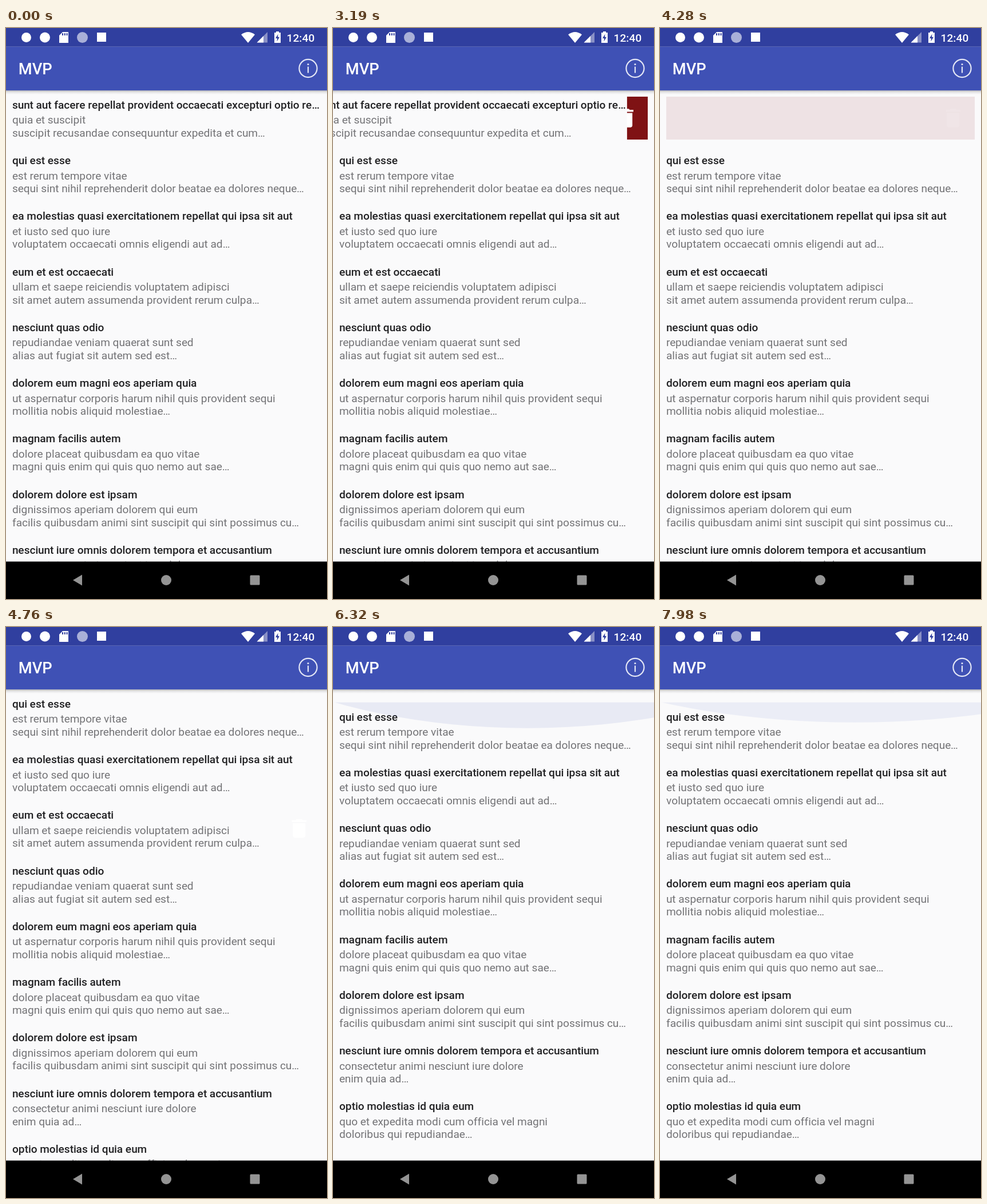
Recreate the animation shown at these times as an HTML page with a canvas. Size 561 by 998 pixels, loop 8 s.

```html
<!DOCTYPE html>
<html lang="la">
<head>
<meta charset="utf-8">
<title>Swipe to delete</title>
<style>
html, body { margin: 0; width: 100%; height: 100%; overflow: hidden; background: #000; }
canvas { display: block; }
</style>
</head>
<body>
<canvas id="stage" width="561" height="998"></canvas>
<script>
const ctx = document.getElementById('stage').getContext('2d');
const W = 561, H = 998, LOOP = 8000;

// Layout follows a 1080 px wide device at 2.625 px per dp
const DEVICE = W / 1080, DENSITY = 2.625;
const dp = n => n * DENSITY * DEVICE;

const BAR = dp(24), HEAD = dp(80), NAV = H - dp(48);
const LEFT = dp(8), RIGHT = W - LEFT, TOP = HEAD + LEFT;
const PITCH = 97.25, CELL = dp(55);
const SHORT = PITCH * 8, INSET = (NAV - HEAD - SHORT) / 2;
const BG = '#fafafb', RED = '#7f1214', DARK = '#303f9f';

const rows = [
  ['sunt aut facere repellat provident occaecati excepturi optio re…', 'quia et suscipit', 'suscipit recusandae consequuntur expedita et cum…'],
  ['qui est esse', 'est rerum tempore vitae', 'sequi sint nihil reprehenderit dolor beatae ea dolores neque…'],
  ['ea molestias quasi exercitationem repellat qui ipsa sit aut', 'et iusto sed quo iure', 'voluptatem occaecati omnis eligendi aut ad…'],
  ['eum et est occaecati', 'ullam et saepe reiciendis voluptatem adipisci', 'sit amet autem assumenda provident rerum culpa…'],
  ['nesciunt quas odio', 'repudiandae veniam quaerat sunt sed', 'alias aut fugiat sit autem sed est…'],
  ['dolorem eum magni eos aperiam quia', 'ut aspernatur corporis harum nihil quis provident sequi', 'mollitia nobis aliquid molestiae…'],
  ['magnam facilis autem', 'dolore placeat quibusdam ea quo vitae', 'magni quis enim qui quis quo nemo aut sae…'],
  ['dolorem dolore est ipsam', 'dignissimos aperiam dolorem qui eum', 'facilis quibusdam animi sint suscipit qui sint possimus cu…'],
  ['nesciunt iure omnis dolorem tempora et accusantium', 'consectetur animi nesciunt iure dolore', 'enim quia ad…'],
  ['optio molestias id quia eum', 'quo et expedita modi cum officia vel magni', 'doloribus qui repudiandae…']
];

// 0 before a, 1 after b, linear between
const ramp = (t, a, b) => Math.min(1, Math.max(0, (t - a) / (b - a)));

// Row closing: eased, stalls part way, then snaps shut
function closing(t, start, snap) {
  if (t >= snap) return 1;
  return (1 - Math.cos(Math.PI * 0.64 * ramp(t, start, start + 160))) / 2;
}

function box(x, y, w, h, fill) {
  ctx.fillStyle = fill;
  ctx.fillRect(x, y, w, h);
}

function disc(x, y, r, fill) {
  ctx.fillStyle = fill;
  ctx.beginPath();
  ctx.arc(x, y, r, 0, 7);
  ctx.fill();
}

function poly(fill, ...p) {
  ctx.fillStyle = fill;
  ctx.beginPath();
  for (let i = 0; i < p.length; i += 2) ctx.lineTo(p[i], p[i + 1]);
  ctx.closePath();
  ctx.fill();
}

function clipTo(x, y, w, h) {
  ctx.beginPath();
  ctx.rect(x, y, w, h);
  ctx.clip();
}

const advances = new Map();

function advance(ch) {
  const key = ctx.font + ch;
  if (!advances.has(key)) advances.set(key, Math.round(ctx.measureText(ch).width));
  return advances.get(key);
}

// Glyph advances snap to whole device pixels
function text(str, x, y, sp, weight, fill) {
  ctx.save();
  ctx.translate(x, y);
  ctx.scale(DEVICE, DEVICE);
  ctx.font = `${weight} ${sp * DENSITY}px Roboto, sans-serif`;
  ctx.fillStyle = fill;
  let pen = 0;
  for (const ch of str) {
    ctx.fillText(ch, pen, 0);
    pen += advance(ch);
  }
  ctx.restore();
}

const binPath = new Path2D('M6 19c0 1.1.9 2 2 2h8c1.1 0 2-.9 2-2V7H6v12zM19 4h-3.5l-1-1h-5l-1 1H5v2h14V4z');

function bin(y) {
  ctx.save();
  ctx.translate(512.3, y + CELL / 2);
  ctx.scale(dp(32) / 24, dp(32) / 24);
  ctx.translate(-12, -12);
  ctx.fillStyle = '#fff';
  ctx.fill(binPath);
  ctx.restore();
}

function rowText(row, x, y) {
  text(row[0], x, y + 21, 14, 500, '#212123');
  text(row[1], x, y + 47.4, 14, 400, '#737376');
  text(row[2], x, y + 69.8, 14, 400, '#737376');
}

// slid: how far the front has moved left; alpha: fade of the removed row
function swipedRow(row, y, slid, alpha) {
  if (alpha <= 0) return;
  const edge = RIGHT - slid, x = Math.max(LEFT, edge);
  ctx.save();
  ctx.globalAlpha = alpha;
  if (slid > 0) {
    box(x, y, RIGHT - x, CELL, RED);
    bin(y);
    clipTo(0, y, Math.max(0, edge), CELL);
    box(0, y, edge, CELL, BG);
  }
  rowText(row, LEFT - slid, y);
  ctx.restore();
}

function list(t) {
  const inset = t < 5040 ? 0 : INSET;
  const up = PITCH * closing(t, 4290, 4760);
  const up2 = PITCH * closing(t, 5330, 6110);

  ctx.save();
  clipTo(0, HEAD + inset, W, NAV - HEAD - 2 * inset);
  rows.forEach((row, i) => {
    const y = TOP + inset + i * PITCH - (i > 0 ? up : 0) - (i > 3 ? up2 : 0);
    if (i === 0) {
      const slid = 139 * ramp(t, 3110, 3420) + 311 * ramp(t, 3590, 3970) ** 2 + 100 * ramp(t, 4150, 4235);
      swipedRow(row, y, slid, 1 - ramp(t, 4200, 4290));
    } else if (i === 3) {
      if (t >= 4760 && t < 4800) bin(y);
      swipedRow(row, y, RIGHT * ramp(t, 4800, 5040), 1 - ramp(t, 5280, 5350));
    } else {
      rowText(row, LEFT, y);
    }
  });
  glow(HEAD + INSET, 1, 340, 46 * Math.sin(Math.PI * ramp(t, 6110, 6480)));
  glow(NAV - INSET, -1, 300, 71 * (ramp(t, 6480, 6830) - ramp(t, 7090, 7390)));
  glow(HEAD + INSET, 1, 340, 60 * (ramp(t, 7390, 7640) - ramp(t, 7760, 8290)));
  ctx.restore();
}

// Overscroll glow: a wide circle squashed to the given depth
function glow(edgeY, dir, cx, depth) {
  if (depth < 0.1) return;
  const r = W * 1.2, ry = depth / (1 - Math.cos(Math.PI / 6));
  ctx.fillStyle = `rgba(63,81,181,${depth / 460})`;
  ctx.beginPath();
  ctx.ellipse(cx, edgeY + dir * (depth - ry), r, ry, 0, 0, Math.PI * 2);
  ctx.fill();
}

function statusBar() {
  box(0, 0, W, BAR, DARK);
  disc(35.5, 16.5, 8.5, '#fff');
  disc(68, 16.5, 9, '#fff');
  poly('#fff', 99, 7, 109, 7, 109, 26, 93, 26, 93, 13);
  for (let i = 0; i < 3; i++) box(98 + i * 3.8, 9, 2, 4, DARK);
  disc(133.5, 16.5, 9.5, '#a9b0d8');
  box(159, 8, 16, 16, '#fff');

  ctx.fillStyle = '#fff';
  ctx.beginPath();
  ctx.moveTo(423, 26);
  ctx.lineTo(411, 11.5);
  ctx.quadraticCurveTo(423, 2.5, 435, 11.5);
  ctx.fill();

  poly('#8990c6', 457, 7, 457, 25.5, 438.5, 25.5);
  poly('#fff', 450, 14, 450, 25.5, 438.5, 25.5);

  box(472, 6, 5, 3, '#fff');
  box(469, 8, 11, 18, '#fff');
  poly(DARK, 475.5, 10.5, 471, 18, 474, 18, 473.5, 23.5, 478, 15.8, 475, 15.8);
  text('12:40', 490.5, 23.5, 14, 500, '#fff');
}

function toolbar() {
  const shade = ctx.createLinearGradient(0, HEAD, 0, HEAD + 7);
  shade.addColorStop(0, 'rgba(0,0,0,.28)');
  shade.addColorStop(0.4, 'rgba(0,0,0,.09)');
  shade.addColorStop(1, 'rgba(0,0,0,0)');
  box(0, HEAD, W, 7, shade);
  box(0, BAR, W, HEAD - BAR, '#3f51b5');
  text('MVP', dp(16), 81.3, 20, 500, '#fff');

  const ink = '#e3e6f5';
  ctx.strokeStyle = ink;
  ctx.lineWidth = 2.2;
  ctx.beginPath();
  ctx.arc(528, 70.5, 15.6, 0, 7);
  ctx.stroke();
  disc(528, 63.5, 1.6, ink);
  box(526.9, 67.5, 2.2, 11, ink);
}

function navBar() {
  const ink = '#949494';
  box(0, NAV, W, H - NAV, '#000');
  poly(ink, 117, 965, 133, 955.5, 133, 974.5);
  disc(280, 965, 9, ink);
  ctx.beginPath();
  ctx.roundRect(426.5, 956.5, 17, 17, 1.5);
  ctx.fill();
}

// Screen dims and clears; the top strip clears last
function dim(t) {
  const clear = ramp(t, 870, 1630);
  box(0, 0, W, 975, `rgba(0,0,0,${0.4 * (ramp(t, 50, 830) - clear)})`);
  box(0, 0, W, 54, `rgba(0,0,0,${0.2 * (clear - ramp(t, 1680, 1870))})`);
}

function draw(t) {
  box(0, 0, W, H, BG);
  list(t);
  toolbar();
  statusBar();
  navBar();
  dim(t);
}

const start = performance.now();
function tick() {
  draw((performance.now() - start) % LOOP);
  requestAnimationFrame(tick);
}
tick();
</script>
</body>
</html>
```
